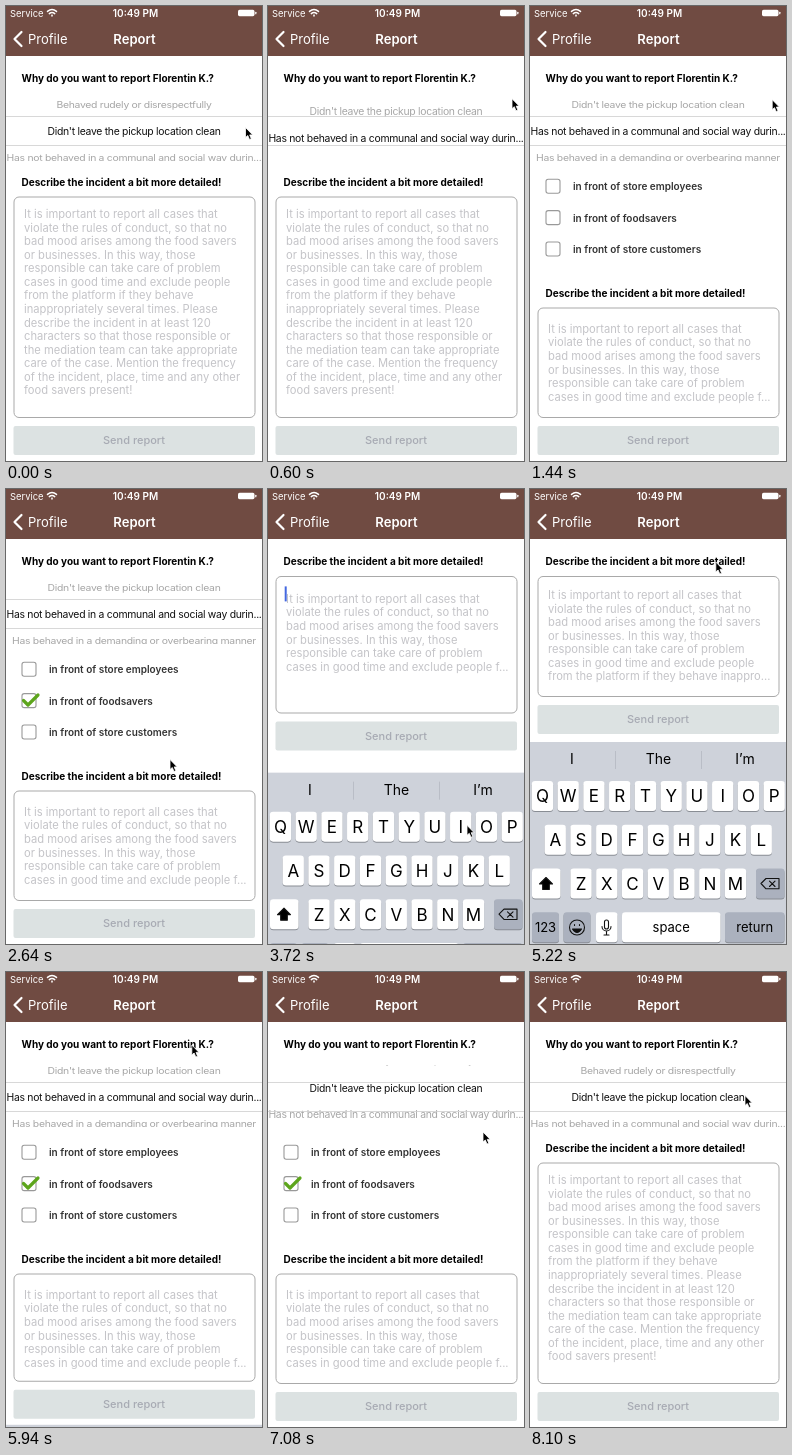
An HTML page for the animation above (8160 ms loop, 256 px wide and 455 px high).

```html
<!DOCTYPE html>
<html lang="en">
<head>
<meta charset="utf-8">
<title>Report form</title>
<style>
  html, body { margin: 0; width: 100%; height: 100%; overflow: hidden; background: #fff; }
  svg { display: block; width: 100%; height: 100%; font-family: Inter, "Open Sans", sans-serif; }
  .mid { text-anchor: middle; }
  .heading { font-size: 10px; font-weight: 700; }
  .label { font-size: 10px; font-weight: 600; fill: #333; }
  .row { font-size: 10.4px; letter-spacing: -.28px; text-anchor: middle; }
  .hint { font-size: 11.2px; fill: #c4c4c8; }
  .key { font-size: 17px; text-anchor: middle; }
  .small { font-size: 13px; text-anchor: middle; }
  .line { fill: none; stroke-linecap: round; stroke-linejoin: round; }
</style>
</head>
<body>
<svg viewBox="0 0 256 455">
  <defs><clipPath id="wheel"><rect y="93" width="256" height="62"/></clipPath></defs>
  <rect width="256" height="455" fill="#fff"/>

  <g id="question">
    <text class="heading" x="15.5" y="75.8">Why do you want to report Florentin K.?</text>
    <g id="rows" clip-path="url(#wheel)"></g>
    <path d="M0 110.5H256M0 139.5H256" stroke="#cfcfcf" stroke-width=".8"/>
  </g>
  <g id="options"></g>

  <g id="form">
    <text id="formHeading" class="heading" x="15.5">Describe the incident a bit more detailed!</text>
    <rect id="box" x="8" width="241" rx="5" fill="#fff" stroke="#a9a9a9"/>
    <g id="hint" class="hint"></g>
    <rect id="caret" x="16.7" width="2" height="15" fill="#4468e0"/>
    <g id="button">
      <rect x="7.5" width="241.5" height="29" rx="2" fill="#dce2e2"/>
      <text class="mid" x="128" y="18.4" font-size="11" font-weight="500" fill="#a7aab3">Send report</text>
    </g>
  </g>

  <g id="keyboard">
    <rect y="253" width="256" height="204" fill="#ced2da"/>
    <path d="M85.5 262V280M171.5 262V280" stroke="#b4b8c0" stroke-width=".8"/>
  </g>

  <g id="header" fill="#fff">
    <rect width="256" height="50" fill="#704b42"/>
    <text x="4" y="10.5" font-size="9.4">Service</text>
    <g class="line" stroke="#fff" stroke-width="1.5">
      <path d="M41.5 5.4Q46 1.6 50.5 5.4M43.3 7.6Q46 5.4 48.7 7.6"/>
      <circle cx="46" cy="9.6" r=".3"/>
    </g>
    <text class="mid" x="129.5" y="10.7" font-size="10" font-weight="600">10:49 PM</text>
    <rect x="232" y="3.8" width="16.5" height="6.4" rx="1.6"/>
    <rect x="249.2" y="5.7" width="1.2" height="2.6" rx=".6"/>
    <path class="line" d="M15.5 26L8.5 33L15.5 40" stroke="#fff" stroke-width="2.2"/>
    <text x="22" y="37.5" font-size="13">Profile</text>
    <text class="mid" x="128.5" y="37.5" font-size="13.1" font-weight="600">Report</text>
  </g>

  <path id="cursor" d="M0 0V10L2.3 8L4 12L5.8 11.2L4.2 7.4H7.2Z" stroke="#fff" stroke-width=".8"/>
</svg>
<script>
const LOOP = 8160, STEP = 60;
const $ = id => document.getElementById(id);

function add(parent, tag, attrs, text) {
  const node = document.createElementNS("http://www.w3.org/2000/svg", tag);
  set(node, attrs);
  if (text) node.textContent = text;
  parent.append(node);
  return node;
}
function set(node, attrs) {
  for (const name in attrs) node.setAttribute(name, attrs[name]);
}
const show = (node, visible) => node.style.display = visible ? "" : "none";
const move = (node, x, y) => node.setAttribute("transform", `translate(${x} ${y})`);

const ease = {
  smooth: u => u * u * (3 - 2 * u),
  in: u => u * u,
  out: u => 1 - (1 - u) ** 2,
  cubicOut: u => 1 - (1 - u) ** 3,
  quartOut: u => 1 - (1 - u) ** 4
};
const progress = (t, start, end, curve = ease.smooth) =>
  curve(Math.min(1, Math.max(0, (t - start) / (end - start))));

// Picker
const rows = [
  "Behaved rudely or disrespectfully",
  "Didn't leave the pickup location clean",
  "Has not behaved in a communal and social way durin...",
  "Has behaved in a demanding or overbearing manner"
].map(text => add($("rows"), "text", { class: "row", y: 3.8 }, text));

function drawPicker(selected) {
  rows.forEach((row, i) => {
    const d = i - selected;
    show(row, Math.abs(d) < 1.6);
    set(row, {
      transform: `translate(128 ${125.2 + 26.7 * d}) scale(1 ${Math.cos(d * .5)})`,
      fill: Math.abs(d) < .5 ? "#111" : "#a6a6a6"
    });
  });
}

// Check boxes
["store employees", "foodsavers", "store customers"].forEach((who, i) => {
  const y = 173.2 + 31.4 * i;
  add($("options"), "rect",
    { x: 16, y, width: 14, height: 14, rx: 2.2, fill: "#fff", stroke: "#999", "stroke-width": 1.1 });
  add($("options"), "text", { class: "label", x: 43, y: y + 10.9 }, "in front of " + who);
});
const check = add($("options"), "path",
  { class: "line", d: "M17.5 211.5L22 216L32 206", stroke: "#5da51c", "stroke-width": 3.2 });

// Hint text
const hintLines = [
  "It is important to report all cases that",
  "violate the rules of conduct, so that no",
  "bad mood arises among the food savers",
  "or businesses. In this way, those",
  "responsible can take care of problem",
  "cases in good time and exclude people",
  "from the platform if they behave",
  "inappropriately several times. Please",
  "describe the incident in at least 120",
  "characters so that those responsible or",
  "the mediation team can take appropriate",
  "care of the case. Mention the frequency",
  "of the incident, place, time and any other",
  "food savers present!"
];
const cutEnds = { 6: " f...", 7: " inappro..." };
const hintNodes = hintLines.map((_, i) => add($("hint"), "text", { x: 18, y: 13.54 * i }));

function drawForm(top, bottom, lines, textTop) {
  set($("formHeading"), { y: top - 11.2 });
  set($("box"), { y: top, height: bottom - top });
  move($("hint"), 0, textTop);
  hintNodes.forEach((node, i) => {
    node.textContent = i < lines ? hintLines[i] + (i === lines - 1 && cutEnds[lines] || "") : "";
  });
  set($("caret"), { y: textTop - 16.5 });
  move($("button"), 0, bottom + 8.5);
}

// Keyboard
const board = $("keyboard"), GREY = "#abb1be";
function key(x, y, width, label, fill = "#fff", cls = "key") {
  add(board, "rect", { x, y: y + 1, width, height: 30, rx: 3.3, fill: "#898d94" });
  add(board, "rect", { x, y, width, height: 30, rx: 3.3, fill });
  if (label) add(board, "text", { class: cls, x: x + width / 2, y: y + (cls === "key" ? 21.4 : 19.4) }, label);
}
const icon = (d, fill = "none") =>
  add(board, "path", { class: "line", d, stroke: "#111", "stroke-width": 1.1, style: `fill:${fill}` });

["I", "The", "I’m"].forEach((word, i) =>
  add(board, "text", { x: 42 + 86.5 * i, y: 275.3, "text-anchor": "middle", "font-size": 14 }, word));
["QWERTYUIOP", "ASDFGHJKL", "ZXCVBNM"].forEach((letters, r) =>
  [...letters].forEach((c, i) => key([1.8, 14.6, 40.4][r] + 25.75 * i, 292 + 43.8 * r, 21.3, c)));
key(2, 379.6, 28.5);
key(226, 379.6, 28.5, "", GREY);
key(2, 423.3, 27, "123", GREY, "small");
key(33.5, 423.3, 27, "", GREY);
key(66, 423.3, 21.5);
key(92, 423.3, 98.5, "space", "#fff", "small");
key(195, 423.3, 59.5, "return", GREY, "small");
icon("M16 388.5L22.5 395H19.3V400.500H12.700V395H9.500Z", "#000");
icon("M231 394.500L236 389.500H249V399.800H236ZM239.500 392.200L245 397.500M245 392.200L239.500 397.500");
icon("M39.500 438.500a7.500 7.500 0 1 0 15 0a7.500 7.500 0 1 0 -15 0M44.500 435.500V436.500M49.500 435.500V436.500");
icon("M42.500 440Q47 447 51.500 440Z", "#111");
icon("M74.500 433a2 2 0 0 1 4 0V438a2 2 0 0 1 -4 0ZM72 437.500a4.500 4.500 0 0 0 9 0M76.500 442.500V446M74 446H79");

// Pointer path: time, x, y, easing towards that point
const path = [
  [0, 239.5, 121.5],
  [60, 244, 122, "smooth"],
  [240, 244, 122, "smooth"],
  [600, 244, 92.7, "smooth"],
  [1400, 244, 92.7, "smooth"],
  [2160, 20, 209, "smooth"],
  [2280, 20, 209, "smooth"],
  [2640, 164, 270.5, "in"],
  [3060, 199, 336.3, "out"],
  [4160, 199, 336.3, "smooth"],
  [4980, 185.8, 73, "smooth"],
  [6200, 185.8, 73, "smooth"],
  [6660, 215, 104, "smooth"],
  [7020, 215, 160, "smooth"],
  [7800, 215, 160, "smooth"],
  [8100, 215, 123.5, "smooth"],
  [LOOP, 239.5, 121.5, "smooth"]
];
function drawCursor(t) {
  const i = path.findIndex(p => p[0] > t);
  const [t0, x0, y0] = path[i - 1], [t1, x1, y1, curve] = path[i];
  const u = progress(t, t0, t1, ease[curve]);
  move($("cursor"), x0 + (x1 - x0) * u, y0 + (y1 - y0) * u);
}

function draw(t) {
  const extended = t >= 840 && t < 7380;
  const typing = t >= 3420 && t < 5400;
  const closing = t >= 5380;
  const slide = curve => closing ? 1 - progress(t, 5380, 6100, ease.cubicOut) : progress(t, 3384, 4104, curve);
  const lift = slide(ease.quartOut), raise = slide(ease.cubicOut);

  drawPicker(1 + progress(t, 220, 800) - progress(t, 6660, 7360));
  show($("question"), !typing);
  show($("options"), extended && !typing);
  show(check, t >= 2280);

  const top = typing ? 87.5 : extended ? 302 : 191;
  const lines = typing && t >= 4080 ? 7 : extended ? 6 : 14;
  const textTop = top + (lines === 6 ? 24.9 : 21.2) + (typing ? 1.5 : 0);
  drawForm(top, Math.max(top + 30, 411.5 - 204 * lift), lines, textTop);
  show($("caret"), typing && t >= 3480 && (t - 3480) % 1000 < 550);

  show(board, raise > 0);
  move(board, 0, 202 * (1 - raise));
  drawCursor(t);
}

function frame() {
  draw(Math.floor(performance.now() % LOOP / STEP) * STEP);
  requestAnimationFrame(frame);
}
frame();
</script>
</body>
</html>
```
